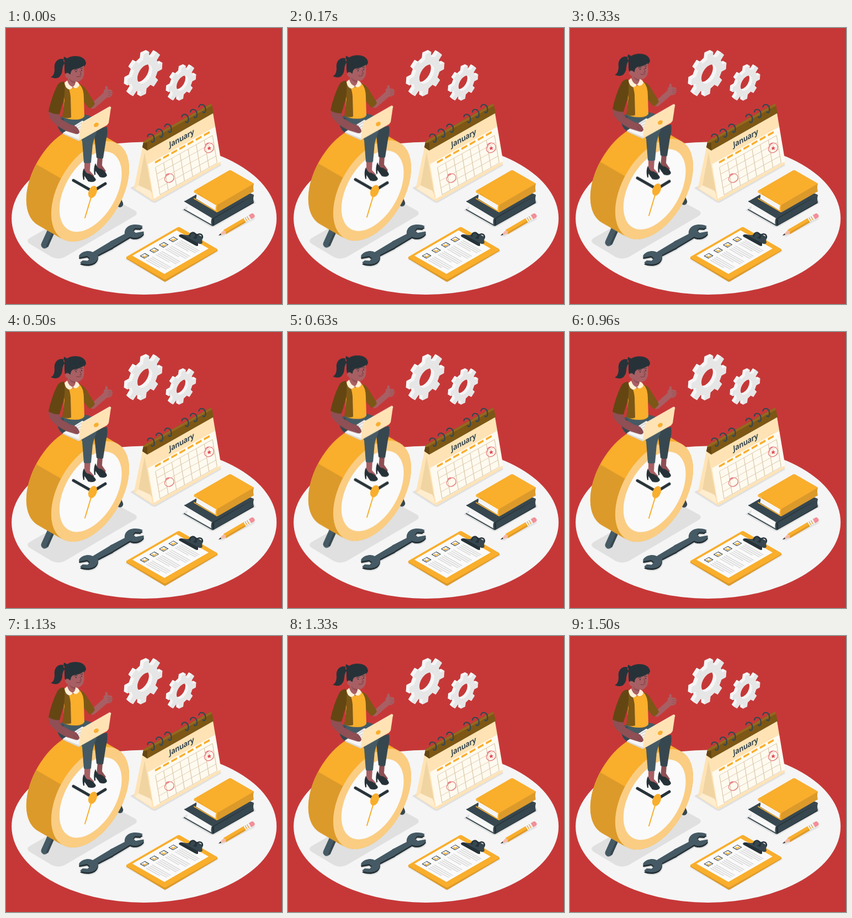
These frames come from a looping animation (500 by 500 pixels, 1540 ms). An HTML page:

```html
<!DOCTYPE html>
<html lang="en">
<head>
<meta charset="utf-8">
<title>Time management</title>
<style>
html, body { margin: 0; height: 100%; overflow: hidden; background: #c63838; }
svg { display: block; width: 100vw; height: 100vh; }
#float { animation: float 770ms cubic-bezier(.37, 0, .63, 1) -50ms infinite alternate; }
@keyframes float { to { transform: translateY(-8.8px); } }
.month { font: 700 14px "Open Sans", Lato, sans-serif; letter-spacing: -.4px; }
.hair, .ink { fill: #263238; }
.slate { fill: #37474f; }
.steel { fill: #455a64; }
.gold { fill: #f9ae2c; }
.ochre { fill: #dc9a2b; }
.cream { fill: #ffe3b5; }
.skin { fill: #a85f63; }
.shade { fill: #8f4f54; }
.coat { fill: #7c5716; }
.cuff { fill: #644612; }
.paper { fill: #fafafa; }
.shadow { fill: #e0e0e0; }
.line { fill: none; stroke-linecap: round; stroke-linejoin: round; }
</style>
</head>
<body>
<svg viewBox="0 0 500 500">
<rect width="500" height="500" fill="#c63838"/>
<ellipse cx="250.2" cy="344.7" rx="240" ry="138.300" fill="#f5f5f5"/>

<g class="shadow">
  <path d="M42 381L170 308Q180 302 190 307L234 331Q240 335 234 340L108 414Q95 421 83 415L43 391Q36 386 42 381Z"/>
  <path d="M225 290L236 284 388 246 390 249 272 316Q268 318 264 315Z"/>
  <path d="M318 330L330 322 449 309 452 317 380 359Q375 362 370 360Z"/>
  <path d="M385 377L445 346 452 344 450 347 392 378Z" opacity=".8"/>
  <path d="M216 419L288 461 385 405 381 398Z" opacity=".8"/>
</g>

<g id="gears"></g>

<g id="calendar">
  <path class="cream" d="M249 207L232 289Q232 291 234 292L268 314 274 307 256 220Z"/>
  <path d="M252 220L240 285 268 300Z" fill="#f0d5a3"/>
  <path d="M240 285L262 295 266 311 234 291Z" fill="#ffedd0"/>
  <path class="cream" d="M250 220L374 152 389 245Q389 247 387 248L271 313Q268 315 267 312Z"/>
  <g transform="matrix(1.22 -.68 .155 .92 253 222)">
    <path class="cream" d="M0 0H100V27H0Z"/>
    <path d="M0 27H100V95H0Z" fill="#fffaf0"/>
    <path id="grid" fill="none" stroke="#d9c7a8" stroke-width=".9"/>
    <path id="days" fill="none" stroke="#f9ae2c" stroke-width="4"/>
  </g>
  <path class="coat" d="M249 207Q250 204 253 203L369 138Q372 136 373 139L376 154 256 222 247 216Z"/>
  <path class="cuff" d="M249 207L256 208 256 222 247 216Z"/>
  <path d="M251 206.500L371 139.500" class="line" stroke="#956820" stroke-width="4"/>
  <text class="month slate" text-anchor="middle" transform="matrix(.87 -.48 .1 1 318.500 204.500)">January</text>
  <g class="line" stroke="#e5737a" stroke-width="1.2">
    <path d="M289 267C293 262 303 263 304 270S297 282 291 279 287 268 295 265"/>
    <path d="M361 212C365 206 375 207 376 215S369 228 363 225 359 213 367 209"/>
  </g>
  <path d="M368 213.500L369.300 216.300 372 216.300 370 218.400 371 221 368 219.800 365.500 221.600 366 218.600 364.300 216.900 367 216.300Z" fill="#e0525c"/>
  <g id="rings" class="line" stroke="#37474f" stroke-width="2.3"></g>
</g>

<g id="books">
  <path class="slate" d="M323 314L386 278 449 302 375 346Z"/>
  <path class="paper" d="M327 317L375 344V356L327 329Q331 322 327 317Z"/>
  <path d="M329 321L375 347M330 325L375 351" class="line" stroke="#e6e6e6" stroke-width=".8"/>
  <path class="ink" d="M374 345L449 302Q446 310 449 317L375 359Q372 352 374 345Z"/>
  <path d="M324 314L374 344Q371 352 374 358L323 329" class="line" stroke="#37474f" stroke-width="2"/>
  <path class="slate" d="M377 345L449 303Q447 310 449 315L377 357Z"/>
  <path class="gold" d="M340 295L404 258Q406 257 408 258L448 281Q450 282 448 284L383 322Z"/>
  <path class="paper" d="M343 298L382 321V332L344 309Q347 303 343 298Z"/>
  <path d="M345 303L381 324M346 306L381 328" class="line" stroke="#e6e6e6" stroke-width=".8"/>
  <path class="ochre" d="M382 321L449 282Q447 289 449 296L383 334Q380 328 382 321Z"/>
  <path d="M341 297L382 321Q379 328 382 333L341 309" class="line" stroke="#f9ae2c" stroke-width="2"/>
</g>

<g id="pencil" transform="translate(385 376) rotate(-30.300)">
  <path d="M0 0L15-4.300V4.300Z" fill="#f6b9a2"/>
  <path class="ink" d="M0 0L5-1.500V1.500Z"/>
  <path class="gold" d="M13-4.300H56V4.300H13L15 0Z"/>
  <path class="ochre" d="M15 1.500H56V4.300H13Z"/>
  <path d="M55-4.300H66V4.300H55Z" fill="#f3f3f3"/>
  <path d="M58-4V4M62-4V4" stroke="#dc9a2b" stroke-width="1.2"/>
  <path d="M66-4.300H72Q75-4 75 0T72 4.300H66Z" fill="#f28f99"/>
</g>

<defs>
  <g id="jaw">
    <path d="M188 387L215 373C214 362 223 356 234 356Q243 356 248 359L243 363 234 362.500 230 367 235 371 249 368.500Q251 371 248 374C243 380 231 382 225 378L190 399Z"/>
  </g>
  <g id="wrench">
    <use href="#jaw"/>
    <use href="#jaw" transform="rotate(180 191 392)"/>
  </g>
</defs>
<use href="#wrench" class="shadow" y="5" x="1"/>
<use href="#wrench" class="ink" y="3"/>
<use href="#wrench" class="steel"/>

<g id="clipboard">
  <path class="ochre" d="M218 415L383 401V404L290 459Q288 460 286 459L218 418Z"/>
  <path class="gold" d="M219 414L311 361Q313 360 315 361L382 400Q384 402 382 403L290 455Q288 456 286 455L219 417Q217 415 219 414Z"/>
  <g transform="matrix(.58 .33 -.8 .46 309 366.500)">
    <path class="paper" d="M0 0H100V100H0Z"/>
    <path id="notes" fill="none" stroke="#dadada" stroke-width="2"/>
    <path id="boxes" fill="none" stroke="#37474f" stroke-width="1.500"/>
  </g>
  <path id="ticks" class="line" stroke="#f9ae2c" stroke-width="1.800"/>
  <path class="ink" d="M313 376Q315 373 320 374L348 389V394Q347 396 343 394L314 378Z"/>
  <path class="slate" d="M320 374Q332 377 334 372L342 371 355 378 357 381Q354 383 356 389 353 393 348 390Z"/>
  <g class="line" stroke="#263238" stroke-width="2.500">
    <path d="M333 377C333 370 340 369 343 373S344 379 341 380M344 381C345 371 356 371 356 379"/>
  </g>
</g>

<g id="float">
  <g id="clock">
    <path d="M201 307L206.500 319" class="line" stroke="#37474f" stroke-width="11.500"/>
    <path d="M84 362L70 393" class="line" stroke="#455a64" stroke-width="13"/>
    <path d="M87 368L75 395" class="line" stroke="#37474f" stroke-width="4"/>
    <g transform="matrix(.705 -.407 0 .814 152.500 296)">
      <path d="M-64-64L0 0" class="line" stroke="#f9ae2c" stroke-width="200"/>
      <path class="ochre" d="M-139-130A100 100 0 0 0-135 7L-71 71A100 100 0 0 1-75-66Z"/>
      <circle r="100" fill="#facd82"/>
      <circle r="80" cx="1" cy="1" class="paper"/>
    </g>
    <path d="M122 276L157 296 180 282" class="line" stroke="#263238" stroke-width="5"/>
    <path d="M155 304L143 344" class="line" stroke="#f9ae2c" stroke-width="2"/>
    <ellipse cx="157" cy="297" rx="7.300" ry="11.500" transform="rotate(22 157 297)" class="gold"/>
  </g>

  <g id="woman">
    <g transform="translate(0 2)">
      <path class="shade" d="M166 230L175 232 174 247 181 257 177 262 164 253Z"/>
      <path class="ink" d="M162 243Q166 254 172 253 181 258 183 265 180 271 170 268L162 257V264H160Q158 252 162 243Z"/>
      <path class="skin" d="M142 240L153 240 152 257 160 266 154 270 142 260Z"/>
      <path class="ink" d="M141 252Q145 263 151 262 161 267 163 273 160 279 149 276L142 266V273H140Q137 261 141 252Z"/>
    </g>
    <path class="slate" d="M157 184L183 179Q185 190 181 204L176 236Q169 238 164 235L160 196Z"/>
    <path class="steel" d="M93 164L106 159 142 157Q155 158 164 168L164 190Q160 198 157 211L154 244Q147 246 141 244L138 205 133 195Q112 196 101 190 91 181 93 164Z"/>
    <path class="slate" d="M93 166L104 164Q104 178 120 189L104 191Q91 183 93 166Z"/>

    <path class="skin" d="M150 139L158 134 177 117Q176 111 180 111 179 105 182 105 185 106 184 111L191 112Q194 115 192 122 190 126 183 126L161 145Q156 148 152 144Z"/>
    <path d="M185 115L192 116M185 118.500L192 119.500M185 122L190 123" class="line" stroke="#8f4f54" stroke-width=".8"/>
    <path class="coat" d="M132 102Q140 103 145 111L161 137Q158 144 151 146L139 132Z"/>
    <path class="gold" d="M107 103Q121 98 133 102 141 109 141 127L142 160Q138 166 126 166 111 166 103 161Z"/>
    <path class="coat" d="M105 98Q115 105 117 125L118 162Q110 165 102 161L106 130 100 106Z"/>
    <path class="skin" d="M112 84L126 91 126 100Q129 107 122 109 111 108 112 96Z"/>
    <path class="shade" d="M114 91Q119 97 126 97V100Q117 100 114 91Z"/>
    <path d="M111 95Q113 104 121 107 118 112 113 111 107 108 106 99ZM126 97Q131 97 133 103 131 109 125 109L121 107Q126 103 126 97Z" fill="#fff0d6"/>

    <path class="hair" d="M105 57C95 53 86 62 88 74 88 82 86 87 81 89 88 92 95 92 98 87 105 79 99 72 107 63ZM105 52L111 55 108 64 104 60Z"/>
    <path class="hair" d="M106 68C105 56 114 51 126 51 138 51 145 57 145 65L140 72 114 90Q106 87 106 76Z"/>
    <path class="skin" d="M116 74Q132 74 141 66L141.500 83Q140 94 132 97 122 98 115 91 109 92 107 86 107 80 114 82Z"/>
    <path class="hair" d="M114 83C112 76 113 69 119 66L143 62Q144 66 140 69 133 74 122 75 117 77 117 84Z"/>
    <circle class="ink" cx="127" cy="79" r="1.100"/>
    <circle class="ink" cx="137" cy="77" r="1.100"/>
    <g class="line" stroke="#263238" stroke-width=".9">
      <path d="M124 76.500Q126 74.500 129 75.500M135 73.500L139 73"/>
      <path d="M134 78L136.500 84 133.500 85M128 88Q132 90 136 87" stroke="#70363c"/>
    </g>

    <path d="M103 190L138 168 157 174 133 204Z" fill="#f5f5f5"/>
    <path d="M103 190V192L132 205 133 202Z" fill="#d9d9d9"/>
    <path d="M115 186L137 172M119 188L138 177M124 190L136 183" class="line" stroke="#d5d5d5" stroke-width="2"/>
    <path class="shade" d="M77 149L96 153Q95 160 101 166L117 175Q129 176 133 188 133 193 126 192L110 187Q86 176 78 160Z"/>
    <path d="M122 184L130 191M126 181L133 188" class="line" stroke="#763c42" stroke-width=".8"/>
    <path class="cuff" d="M105 97Q97 97 93 104 83 123 77 151 86 157 97 156L104 132Q108 111 105 97Z"/>
    <path class="cream" d="M138 171L187 143Q190 142 190 145L186 172 183 176 135 203Q132 204 132 201L136 174Z"/>
    <path d="M138 171L187 143Q190 142 190 145" class="line" stroke="#fff2dc" stroke-width="1"/>
    <ellipse cx="163.500" cy="175.500" rx="4.800" ry="3.600" transform="rotate(-35 163.500 175.500)" class="gold"/>
  </g>
</g>
</svg>
<script>
const $ = id => document.getElementById(id);
const range = (n, f) => Array.from({ length: n }, (_, i) => f(i));
const setPath = (id, parts) => $(id).setAttribute('d', parts.join(''));

function gearPath(r) {
  const at = (deg, k) => {
    const a = deg * Math.PI / 180;
    return (Math.cos(a) * r * k).toFixed(2) + ' ' + (Math.sin(a) * r * k).toFixed(2);
  };
  const teeth = range(8, i => {
    const a = 5.5 + i * 45;
    return [at(a - 13, .76), at(a - 9, 1), at(a + 9, 1), at(a + 13, .76)].join('L');
  });
  const h = r * .42;
  return `M${teeth.join('L')}ZM${h} 0A${h} ${h} 0 1 0 ${-h} 0A${h} ${h} 0 1 0 ${h} 0Z`;
}

// Stack copies from back to front to give the gear its depth.
function gear(x, y, r, depth) {
  const d = gearPath(r);
  return range(depth * 2 + 1, i => {
    const k = depth - i / 2;
    const fill = k ? '#f5f5f5' : '#e6e6e6';
    return `<path d="${d}" fill="${fill}" fill-rule="evenodd" transform="matrix(.866 -.5 0 1 ${x - k} ${y - k * .57})"/>`;
  }).join('');
}
$('gears').innerHTML = gear(251.5, 83.5, 37, 6) + gear(319.5, 100, 29, 5);

$('rings').innerHTML = [0, 1, 2, 4, 5, 6].map(i =>
  `<path d="M-6-3c1-7 12-6 12 5c0 6-4 6-5 4" transform="translate(${262.5 + i * 15.5} ${199.5 - i * 8.9})"/>`
).join('');

setPath('days', range(7, i => `M${10 + i * 12.1} 31h8.5`));
setPath('grid', [
  ...range(8, i => `M${9.5 + i * 12.1} 40V94`),
  ...range(5, i => `M9.5 ${40 + i * 13.5}h84.700`)
]);

const rows = range(4, i => 21.7 + i * 21.6);
setPath('boxes', rows.map(v => `M13 ${v - 5}h13v10h-13z`));
setPath('notes', rows.flatMap(v => range(4, j => `M34 ${v - 6.5 + j * 4.3}h${j === 3 ? 42 : 58}`)));
setPath('ticks', range(4, i => `M${300.5 - i * 17.3} ${383 + i * 10}l2 2 4-2.500`));
</script>
</body>
</html>
```
